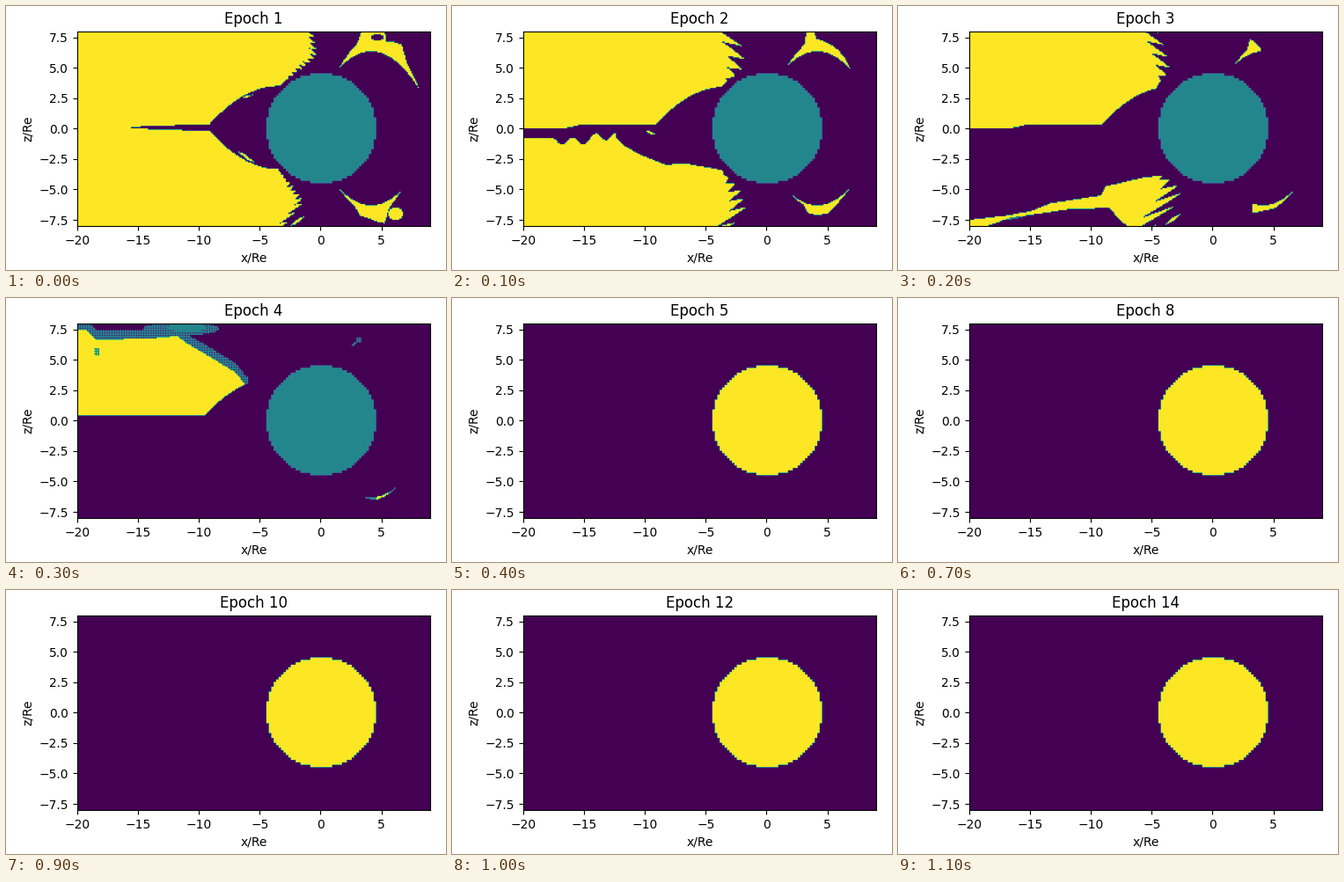
Animation of 500x300 px, one loop 1.2 s. Source, as a matplotlib script:

```python
import numpy as np
import matplotlib.pyplot as plt
from matplotlib.animation import FuncAnimation

W, H, DPI = 500, 300, 100
LEFT, TOP, RIGHT, BOTTOM = 80.7, 28.6, 482, 250
CELL = 0.1
TEAL, YELLOW = 0.92, 2

# Cell centres in Earth radii
X, Z = np.meshgrid(np.arange(-20, 9 - CELL / 2, CELL) + CELL / 2,
                   np.arange(8, -8 + CELL / 2, -CELL) - CELL / 2)
ROW, COL = np.indices(X.shape)
LATTICE = (ROW % 2 == 1) | (COL % 2 == 1)


def oval(cx, cz, rx, rz):
    return ((X - cx) / rx) ** 2 + ((Z - cz) / rz) ** 2 < 1


def streak(x0, z0, x1, z1, width=0.14):
    """Thin lens between two points."""
    t = (X - x0) / (x1 - x0)
    bulge = width * np.sin(np.pi * np.clip(t, 0, 1))
    return np.abs(Z - z0 - t * (z1 - z0)) < bulge


def flank(shift=0.0):
    """Height of the closed inner region, a parabola rising towards the body."""
    u = (np.clip(X - shift, -9.4, -3.5) + 3.5) / 5.9
    return 3.4 * (1 - u ** 2)


def tail():
    return np.interp(X, [-20, -17, -15.5, -9.5], [-0.3, -0.1, 0.25, 0.35])


def cusp(zs, xs, depth, pitch, slope=0.5):
    """Cells left of an edge x(z) that is frayed into slanted fingers."""
    phase = (Z + np.sign(Z) * slope * X) / pitch % 1
    reach = depth * np.clip((np.abs(Z) - 3.6) / 1.5, 0, 1)
    return X < np.interp(Z, zs, xs) + reach * (2 * np.abs(phase - 0.5) - 0.3)


def crescent(side, xs, widths):
    """Layer of varying width on the dayside arc; side is 1 north, -1 south."""
    gap = side * Z - 6.3 + 0.2 * (X - 4.1) ** 2
    return (gap > 0) & (gap < np.interp(X, xs, widths, left=0, right=0))


def build(*parts, body=TEAL):
    """Paint (mask, value) pairs in order, the body on a coarser grid last."""
    field = np.zeros(X.shape)
    for mask, value in parts:
        field[mask] = value
    gx, gz = (np.round(v / 0.2) * 0.2 for v in (X, Z))
    field[gx ** 2 + gz ** 2 < 4.5 ** 2] = body
    return field


def epoch_1():
    sheet = np.interp(X, [-15.7, -15.6, -9.5], [-1, 0.06, 0.28])
    closed = np.abs(Z - 0.06) < np.maximum(sheet, flank())
    edge = cusp([-8, -6, -3.4, 3.4, 6, 8], [-3.4, -1.8, -3.5, -3.5, -0.7, -1],
                depth=0.6, pitch=0.45)
    north = crescent(1, [1.4, 3, 3.35, 5.2, 5.35, 6.6, 7, 8.1],
                     [0, 0.95, 1.9, 2, 1.1, 1.8, 0.8, 0])
    south = crescent(-1, [1.4, 2.8, 3.2, 4, 5.2, 5.6, 6.6],
                     [0, 0.5, 1, 1.1, 1.7, 0.6, 0])
    return build((edge & ~closed, YELLOW), (north | south, YELLOW),
                 (oval(6.1, -7, 0.6, 0.55), YELLOW),
                 (oval(4.6, 7.45, 0.5, 0.28), 0),
                 (streak(-6.8, -1.9, -5.5, -2.8), YELLOW),
                 (streak(-6.5, 2.5, -5.6, 2.75, 0.08), YELLOW),
                 (streak(-2.5, -8, -1.4, -7.2), YELLOW))


def epoch_2():
    upper = (Z > np.maximum(tail(), flank())) & cusp(
        [3.4, 4.5, 6.5, 8], [-3.7, -2.9, -2.9, -4], depth=1.5, pitch=0.95)
    floor = np.interp(X, [-20, -18, -16, -12.6, -11.6, -10.3, -8.3, -6.9, -3.8],
                      [-0.75, -0.75, -1.15, -0.5, -1.5, -2.2, -3, -2.85, -3.4])
    ripple = 0.35 * np.cos(2 * np.pi * (X + 16.9) / 1.87)
    floor -= ripple * ((X > -17.4) & (X < -12.4))
    lower = (Z < floor) & cusp([-8, -6.5, -5, -3.4], [-3.7, -2.6, -3, -3.7],
                               depth=1.3, pitch=0.8)
    north = crescent(1, [1.6, 3.1, 3.2, 3.9, 4, 5.8, 6.5, 6.8],
                     [0, 0.8, 1.9, 1.7, 1, 0.7, 0.4, 0])
    south = crescent(-1, [1.6, 3, 3.3, 5.1, 5.5, 6.8],
                     [0, 0.2, 0.75, 0.8, 0.5, 0])
    return build((upper | lower | north | south, YELLOW),
                 (streak(-10, -0.2, -9.1, -0.55, 0.1), YELLOW))


def epoch_3():
    upper = (Z > np.maximum(tail(), flank())) & cusp(
        [3.3, 4.4, 5.6, 8], [-4.6, -4.3, -4.5, -5.4], depth=1.3, pitch=0.8)
    roof = np.interp(X, [-20, -17, -15, -13.4, -11.8, -9.2, -8.8, -5.6, -4.4],
                     [-7.5, -7.15, -6.8, -6.15, -5.9, -5.5, -4.75, -4, -3.9])
    floor = np.interp(X, [-20, -18.5, -16.6, -15, -12, -8.5, -7.6, -7],
                      [-8, -8, -7.3, -7.1, -6.65, -6.5, -7.6, -8])
    lower = (Z < roof) & (Z > floor) & cusp(
        [-8, -7, -6, -5, -3.9], [-6, -5, -4.2, -3.9, -4.3], depth=2, pitch=0.8)
    north = crescent(1, [1.7, 2.8, 3, 3.4, 3.9], [0, 0.5, 1.25, 0.9, 0.2])
    south = crescent(-1, [3.2, 3.4, 4.2, 5.1, 6.7], [0.7, 0.7, 0.4, 0.4, 0])
    return build((streak(-17.6, -7.5, -14.6, -6.85, 0.2), TEAL),
                 (upper | lower | north | south, YELLOW),
                 (streak(-3.9, -7.9, -2.7, -7), YELLOW))


def epoch_4():
    base = np.maximum(0.4, flank(-0.5))
    roof = np.interp(X, [-20, -19.2, -18.4, -14, -11.8, -11, -9.1, -7, -6.2],
                     [7.35, 7.4, 6.6, 6.7, 6.9, 6.3, 5.2, 3.9, 2.9])
    rim = (Z > base) & (X < -6) & (Z < roof + 0.75)
    stream = oval(-11.5, 7.5, 3.1, 0.55)
    north_tip = oval(3.1, 6.6, 0.2, 0.25)
    south = crescent(-1, [3.6, 4.6, 6.1], [0.1, 0.22, 0.1])
    return build((rim & LATTICE, TEAL), (stream & LATTICE, TEAL),
                 (oval(-11, 7.6, 1.6, 0.35), TEAL),
                 ((Z > base) & (Z < roof) & (X < -6.3), YELLOW),
                 (oval(-18.4, 5.6, 0.22, 0.35) & LATTICE, TEAL),
                 (north_tip & LATTICE, TEAL),
                 (streak(2.5, 6.1, 3, 6.45, 0.08), TEAL),
                 (south, TEAL), (south & (np.abs(X - 5) < 0.5), YELLOW))


FIELDS = [epoch_1(), epoch_2(), epoch_3(), epoch_4(), build(body=YELLOW)]
EPOCHS = [*range(1, 11), 12, 14]

fig = plt.figure(figsize=(W / DPI, H / DPI), dpi=DPI)
ax = fig.add_axes([LEFT / W, 1 - BOTTOM / H, (RIGHT - LEFT) / W,
                   (BOTTOM - TOP) / H])
image = ax.imshow(FIELDS[0], extent=(-20, 9, -8, 8), cmap="viridis", vmin=0,
                  vmax=YELLOW, aspect="auto")
ax.set_xticks(np.arange(-20, 6, 5))
ax.set_yticks(np.arange(-7.5, 8, 2.5))
ax.set_xlabel("x/Re")
ax.set_ylabel("z/Re")
title = ax.set_title("Epoch 1")


def update(i):
    image.set_data(FIELDS[min(i, len(FIELDS) - 1)])
    title.set_text(f"Epoch {EPOCHS[i]}")
    return image, title


anim = FuncAnimation(fig, update, frames=len(EPOCHS), interval=100, repeat=True,
                     repeat_delay=0, blit=False)
plt.show()
```
